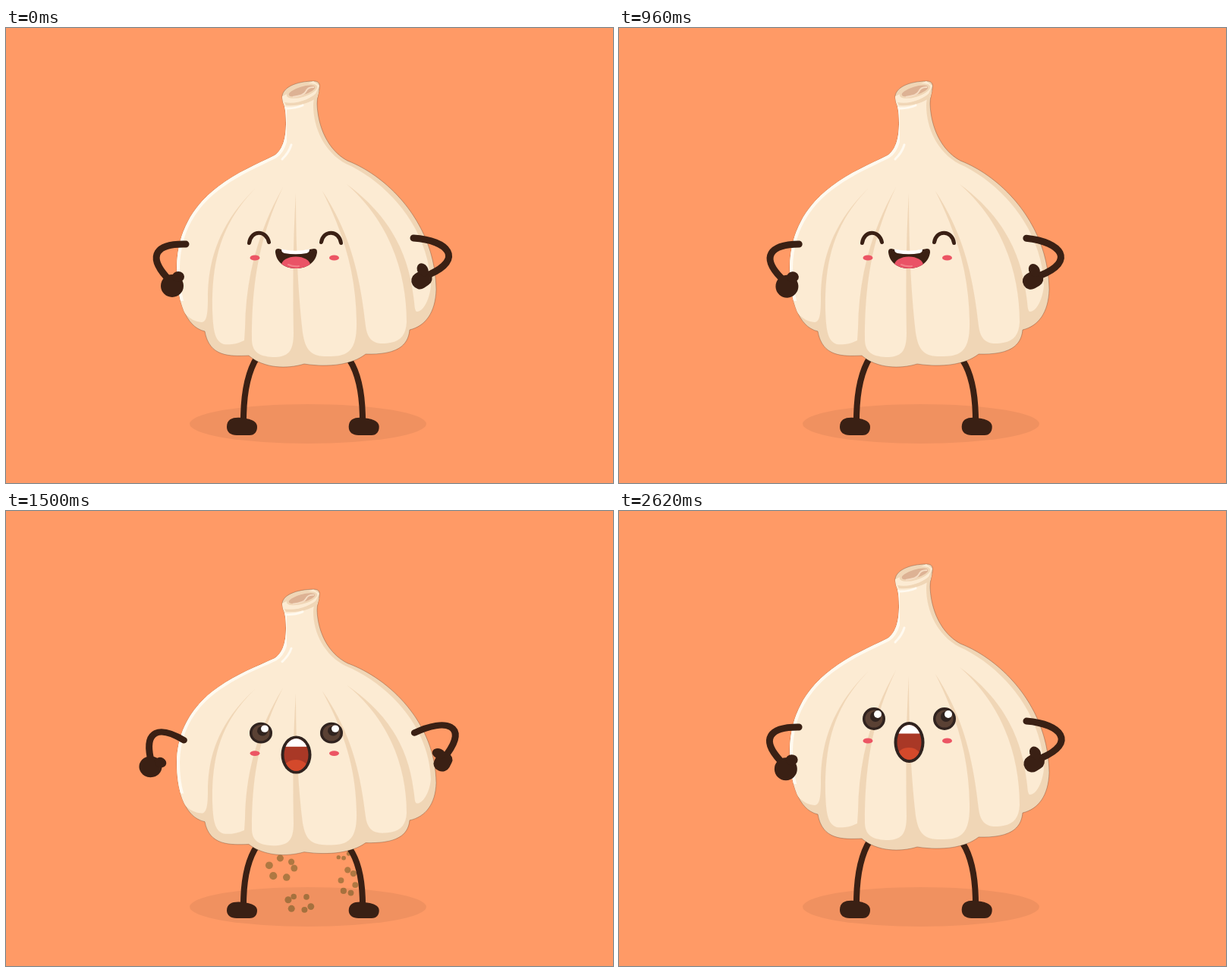
Animation, 800 px wide and 600 px high, one loop 2640 ms. Source, as an HTML page:

```html
<!DOCTYPE html>
<html lang="en">
<head>
<meta charset="utf-8">
<title>Jumping garlic</title>
<style>
html, body { margin: 0; height: 100%; overflow: hidden; background: #ff9a66; }
svg { display: block; }
.line { fill: none; stroke: #3a2014; stroke-linecap: round; }
.ink { fill: #3a2014; }
</style>
</head>
<body>
<svg width="800" height="600">
  <defs>
    <path id="bulb" d="M364 92C363 79 382 70 406 70C413 70 414 75 413 80C412 88 410 92 410 100C411 130 424 161 450 175C506 197 566 260 567 345C566 375 553 393 532 398C530 420 514 431 474 430C456 444 426 448 393 443C370 450 340 449 320 432C295 433 268 434 262 400C236 394 225 358 225 315C226 270 245 235 280 209C305 190 330 180 354 168C366 160 369 142 369 125C369 108 367 103 365 98Z"/>
    <clipPath id="inBulb"><use href="#bulb"/></clipPath>
    <clipPath id="inSmile"><path id="smile" d="M359 291C355 291 355 294 355 296C357 310 368 317 382 317S408 310 410 296C410 294 410 291 406 291L400 292Q382 297 363 292Z"/></clipPath>
    <clipPath id="inShout"><ellipse cx="382.5" cy="305" rx="16" ry="23"/></clipPath>
    <path id="shoe" class="ink" d="M291 526C291 515 300 513 310 514C319 515 331 517 331 526C331 532 328 537 321 537H304C296 537 291 533 291 526Z"/>
    <g id="eye">
      <circle r="15" fill="#30231f"/>
      <circle r="11.5" fill="#5a4134"/>
      <circle cx="2" cy="-3" r="7" fill="#30231f"/>
      <circle cx="5" cy="-6" r="5" fill="#fff"/>
    </g>
  </defs>

  <g id="dust" fill="#af7842"></g>
  <ellipse id="shadow" cx="398" cy="522" ry="26" opacity=".06"/>

  <g id="hero">
    <path class="line" stroke-width="8" d="M331 434C317 456 313 490 313 518M453 438C467 460 470 490 470 518"/>
    <use href="#shoe"/>
    <use href="#shoe" x="160.7"/>

    <use href="#bulb" fill="#f0d6b6" stroke="#3a2014" stroke-width=".5" stroke-opacity=".6"/>
    <g clip-path="url(#inBulb)">
      <path fill="#fcebd3" d="M360 92L405 70L413 76C409 85 405 92 405 102C405 132 420 164 448 179C502 203 558 264 560 340C558 360 549 374 542 374C538 374 539 366 537 354C530 296 505 247 449 206C505 255 528 322 528 388C527 407 518 415 499 416C482 417 476 408 474 393C467 330 455 273 417 215C447 275 461 326 462 386C463 424 452 433 428 433C402 434 395 426 391 402C385 350 382 290 382 218C378 285 378 340 379 402C379 427 372 434 352 434C333 433 324 427 324 410C324 335 334 275 365 210C333 267 316 326 315 396L314 412C304 417 294 418 287 417C274 413 273 395 272 372C271 305 284 258 328 212C279 260 266 309 266 357C266 374 265 388 258 388C243 387 234 376 225 362L215 300L280 190L350 160Z"/>
      <svg y="104" width="370" height="256" viewBox="0 104 370 256">
        <use href="#bulb" fill="none" stroke="#fffaf0" stroke-width="8"/>
      </svg>
      <path fill="#f0d6b6" d="M367 98C384 101 402 94 413 82L411 91C399 100 385 103 369 102Z"/>
    </g>
    <g transform="rotate(-17 390 83)">
      <ellipse cx="390" cy="83" rx="21" ry="8" fill="#f0d6b6"/>
      <ellipse cx="390" cy="83" rx="18" ry="5.5" fill="#ddb294"/>
      <path fill="none" stroke="#f5dcc3" stroke-width="2" d="M376 87Q391 90 395 85T407 83"/>
    </g>
    <path fill="none" stroke="#fffaf0" stroke-width="3" stroke-linecap="round" d="M364 173Q373 164 376 154M371 106Q382 106 391 102"/>

    <g fill="#ec5564">
      <ellipse cx="328" cy="303" rx="6.5" ry="3.6"/>
      <ellipse cx="432.5" cy="303" rx="6.5" ry="3.6"/>
    </g>
    <path id="happyEyes" class="line" stroke-width="5" d="M320.5 283.5C323 266 343 266 346.5 282.5M415.5 282.5C418 266 439 266 441.5 283.5"/>
    <g id="happyMouth">
      <use href="#smile" class="ink"/>
      <g clip-path="url(#inSmile)">
        <ellipse cx="382" cy="313" rx="19" ry="11.5" fill="#ea5366"/>
        <path fill="none" stroke="#f27f88" stroke-width="2" stroke-linecap="round" d="M372 312Q379 315 386 314"/>
      </g>
      <path fill="#fff" d="M363 291.5Q382 296 400 291.5Q400 296 396 297Q382 299.5 367 297Q363 296 363 291.5Z"/>
    </g>
    <g id="wideEyes">
      <use href="#eye" x="336" y="274"/>
      <use href="#eye" x="429" y="274"/>
    </g>
    <g id="wideMouth">
      <ellipse cx="382.5" cy="305" rx="20" ry="27" fill="#30231f"/>
      <g clip-path="url(#inShout)">
        <rect x="360" y="278" width="45" height="54" fill="#a93826"/>
        <rect x="360" y="278" width="45" height="15.5" fill="#fff"/>
        <ellipse cx="382" cy="323" rx="15" ry="11" fill="#d4492b"/>
      </g>
    </g>

    <g id="armL">
      <path class="line" stroke-width="9" d="M237 285C198 284 186 300 212 329"/>
      <circle class="ink" cx="219" cy="340" r="15"/>
      <ellipse class="ink" cx="227" cy="328" rx="8" ry="7"/>
    </g>
    <g id="armR">
      <path class="line" stroke-width="9" d="M537 277C584 280 603 305 558 325"/>
      <g class="ink" transform="translate(558 325) rotate(147)">
        <rect x="-2" y="-11" width="28" height="22" rx="10.5"/>
        <ellipse cx="4" cy="10" rx="7" ry="9"/>
      </g>
    </g>
  </g>
</svg>
<script>
const LOOP = 2640, BOB = 480, GROUND = 537, TAU = 2 * Math.PI;
const $ = id => document.getElementById(id);
const span = (t, a, b) => Math.max(0, Math.min(1, (t - a) / (b - a)));
const wave = u => (1 - Math.cos(Math.PI * u)) / 2;
const ease = (t, a, b) => wave(span(t, a, b));
const hop = (t, a, b) => Math.sin(Math.PI * span(t, a, b));
const mix = (a, b, u) => a + (b - a) * u;

// Clumps the dust ring breaks into: centre and half size
const clumps = [
  [363, 471, 28, 22], [415, 438, 19, 12], [443, 450, 15, 13],
  [451, 489, 16, 26], [387, 517, 28, 16]
];
const PER_CLUMP = 6, PUFFS = clumps.length * PER_CLUMP;

let seed = 7;
const random = () => (seed = seed * 16807 % 2147483647) / 2147483647;

const puffs = Array.from({ length: PUFFS }, (_, i) => {
  const [x, y, w, h] = clumps[Math.floor(i / PER_CLUMP)];
  const around = TAU * (i / PUFFS - 0.53);
  const turn = TAU * (i + random() * 0.5) / PER_CLUMP;
  const node = document.createElementNS("http://www.w3.org/2000/svg", "circle");
  return {
    node: $("dust").appendChild(node),
    ring: [399 + 34 * Math.cos(around), 483 + 27 * Math.sin(around), 16 + 4 * random()],
    clump: [x + 0.6 * w * Math.cos(turn), y + 0.6 * h * Math.sin(turn), (w + h) * (0.18 + 0.06 * random())]
  };
});

function drawDust(t) {
  const grow = Math.sin(span(t, 1040, 1140) * Math.PI / 2);
  const split = span(t, 1140, 1380);
  const size = grow * (1 - span(t, 1380, 1600));
  for (const { node, ring, clump } of puffs) {
    const [x, y, r] = ring.map((v, k) => mix(v, clump[k], split));
    node.setAttribute("cx", mix(399, x, grow));
    node.setAttribute("cy", mix(483, y, grow));
    node.setAttribute("r", r * size);
  }
}

// Outward swing of both arms in degrees; it trails the body a little
function swing(t) {
  const late = t - 40;
  if (late < 2 * BOB) return late < 0 ? 0 : -36 * wave(late / BOB * 2);
  return 68 * ease(t, 1000, 1340) - 112 * ease(t, 1400, 1660) + 44 * ease(t, 2420, LOOP);
}

function stretch(t) {
  if (t < 2 * BOB) return 1 - 0.031 * wave(t / BOB * 2);
  return 1 - 0.071 * (ease(t, 960, 1200) - ease(t, 1560, 1760));
}

function drawFace(t) {
  const happy = t < 1180;
  const beat = t % BOB;
  const open = beat < 160 || beat >= 220;
  const show = (id, on) => $(id).style.display = on ? "" : "none";
  show("happyEyes", happy && open);
  show("wideEyes", !happy && open);
  show("happyMouth", happy);
  show("wideMouth", !happy);
}

function draw(t) {
  const lift = 63 * hop(t, 1046, 1474);
  const angle = swing(t);
  $("hero").setAttribute("transform",
    `translate(0 ${GROUND - lift}) scale(1 ${stretch(t)}) translate(0 ${-GROUND})`);
  $("armL").setAttribute("transform", `rotate(${angle} 237 280)`);
  $("armR").setAttribute("transform", `rotate(${-angle} 532 273)`);
  $("shadow").setAttribute("rx", 156 + 42 * hop(t, 1050, 1490));
  drawFace(t);
  drawDust(t);
}

const start = performance.now();
function tick() {
  draw((performance.now() - start) % LOOP);
  requestAnimationFrame(tick);
}
tick();
</script>
</body>
</html>
```
